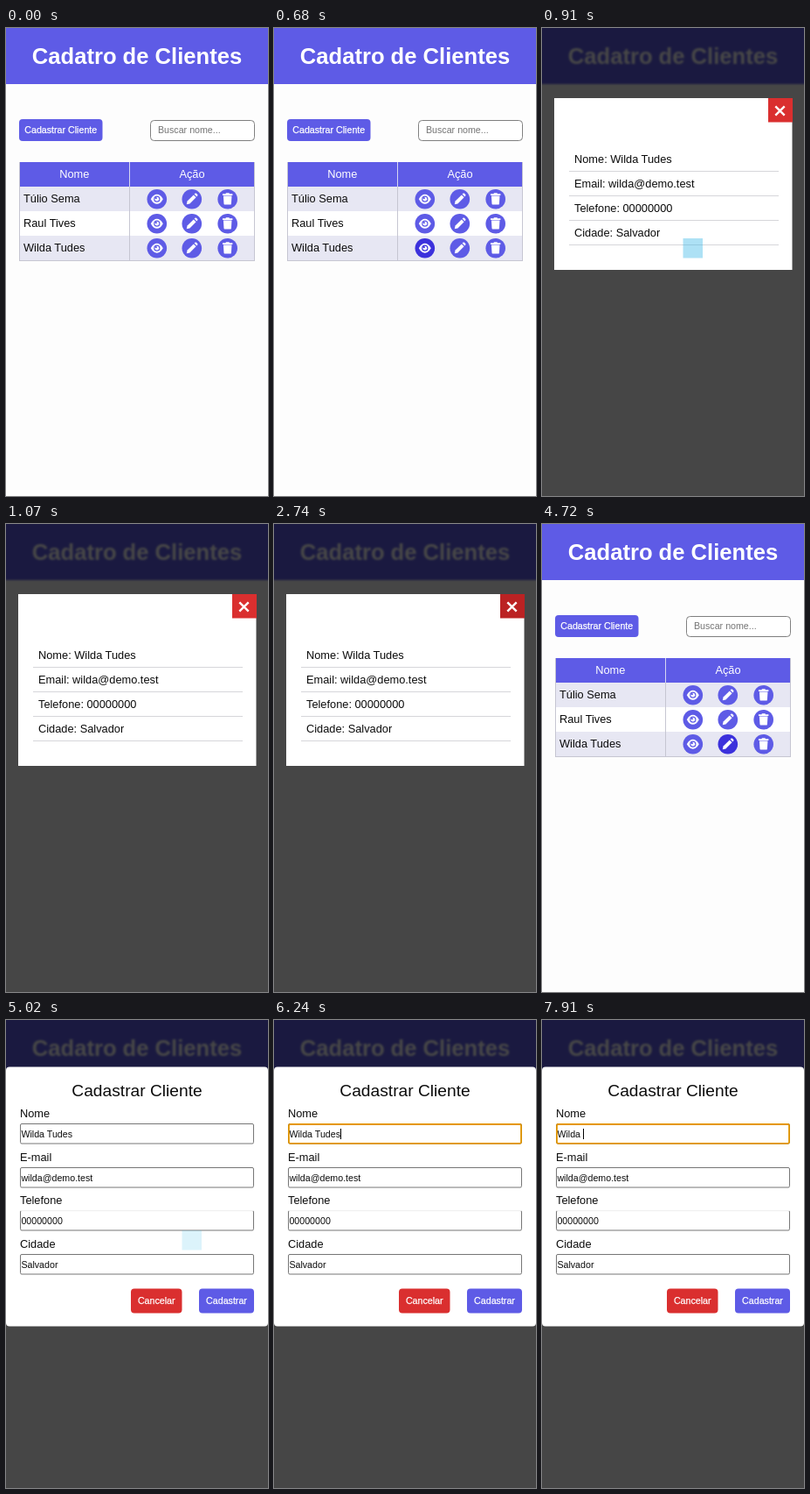
An HTML page that plays this animation: 300x534 px, repeating every 7990 ms.

```html
<!DOCTYPE html>
<html lang="pt">
<head>
<meta charset="utf-8">
<title>Clientes</title>
<style>
  html, body { margin: 0; width: 100%; height: 100%; overflow: hidden; background: #fdfdfd; }
  svg { display: block; width: 100vw; height: 100vh; }
  text { font: 12.8px "Liberation Sans", Arial, sans-serif; fill: #0c0c0c; white-space: pre; }
  .small { font-size: 10.667px; }
  .heading { font-size: 25.6px; font-weight: bold; }
  .title { font-size: 19.2px; }
  .mid { text-anchor: middle; }
  .light { fill: #fff; }
  .strong { stroke: #fff; stroke-width: .25; }
  .hint { fill: #757575; }
</style>
</head>
<body>
<svg id="stage" viewBox="0 0 300 534"></svg>
<script>
const PURPLE = '#5e5be6', DEEP = '#3c31dc', RED = '#da2f2f', DARK_RED = '#bb2223';
const TAP = '#33b5e5', STRONG = 0.4, FADED = 0.17;
const LOOP = 7990;
const client = { name: 'Wilda Tudes', email: 'wilda@demo.test', phone: '00000000', city: 'Salvador' };

const rect = (x, y, w, h, fill, extra = '') =>
  `<rect x="${x}" y="${y}" width="${w}" height="${h}" fill="${fill}" ${extra}/>`;
const text = (x, y, str, cls = '', extra = '') =>
  `<text x="${x}" y="${y}" class="${cls}" ${extra}>${str}</text>`;
const path = d => `<path d="${d}" fill="#fff"/>`;
const button = (x, y, w, h, fill, label, baseline) =>
  rect(x, y, w, h, fill, 'rx="4"') + text(x + w / 2, baseline, label, 'small light strong mid');

const icons = {
  eye: path('M-7 0Q-4-5.5 0-5.5T7 0Q4 5.5 0 5.5T-7 0Z') +
    '<circle r="3.6" fill="currentColor"/><circle r="2.4" fill="#fff"/>' +
    '<circle cx="-1" cy="-1" r="1.1" fill="currentColor"/>',
  pen: path('M-6 6L-5.2 2.4L2-4.8L4.8-2L-2.4 5.2Z') +
    path('M2.8-5.6L4-6.6Q4.6-7 5.2-6.4L6.4-5.2Q7-4.6 6.5-4L5.6-2.8Z'),
  bin: path('M-5.7-6H-2V-7H2V-6H5.7V-4.3H-5.7Z') +
    path('M-4.8-3.6H4.8L4.2 5.2Q4.1 6.4 3 6.4H-3Q-4.1 6.4-4.2 5.2Z')
};
const iconX = { eye: 172.8, pen: 212.8, bin: 253.7 };

function tableRow(name, i) {
  const y = 181 + i * 28;
  const actions = Object.keys(icons).map(kind =>
    `<g id="${kind}${i}" transform="translate(${iconX[kind]} ${y + 14.2})" color="${PURPLE}">
      <circle r="11.3" fill="currentColor"/>${icons[kind]}</g>`).join('');
  return rect(15, y, 270, 28, i % 2 ? '#fff' : '#e7e7f3') +
    rect(15, y + 28, 270, 1, '#c6c6d2') + text(20, y + 18, name) + actions;
}

const list = `<g id="list">
  ${button(15, 104, 95.5, 25, PURPLE, 'Cadastrar Cliente', 120)}
  ${rect(165.5, 105.5, 119, 23, '#fff', 'rx="4" stroke="#808080"')}
  ${text(174, 120, 'Buscar nome...', 'small hint')}
  ${rect(15, 153, 270, 28, PURPLE)}
  ${text(78.3, 171, 'Nome', 'light mid')}${text(213, 171, 'Ação', 'light mid')}
  ${['Túlio Sema', 'Raul Tives', client.name].map(tableRow).join('')}
  ${rect(141, 153, 1, 28, '#d6d6f2')}${rect(141, 181, 1, 85, '#c6c6d2')}
  ${rect(15, 153, 1, 113, '#c6c6d2')}${rect(284, 153, 1, 113, '#c6c6d2')}
</g>`;

const details = [['Nome', client.name], ['Email', client.email], ['Telefone', client.phone], ['Cidade', client.city]];
const view = `<g id="view">
  ${rect(14, 80, 272.5, 196, '#fff')}
  ${rect(259, 80, 28, 27.5, RED, 'id="close"')}
  <path d="M267.3 89.3L277.7 99.7M277.7 89.3L267.3 99.7" stroke="#fff" stroke-width="2.4"/>
  ${details.map(([key, value], i) =>
    text(37, 154 + i * 28, `${key}: ${value}`) + rect(31, 163 + i * 28, 240, 1, '#d6d6da')).join('')}
</g>`;

const fields = [['Nome', 118, client.name], ['E-mail', 168, client.email],
  ['Telefone', 217, client.phone], ['Cidade', 267, client.city]];
const form = `<g id="form">
  ${rect(0, 53.5, 300, 296, '#fff', 'rx="4"')}
  ${text(150, 87, 'Cadastrar Cliente', 'title mid')}
  ${fields.map(([label, y, value], i) =>
    text(16, y - 7, label) +
    rect(16.5, y + .5, 267, 22.5, '#fff', 'rx="1.5" stroke="#767676"') +
    text(17.4, y + 16, value, 'small', `id="value${i}"`)).join('')}
  ${rect(17, 217, 266, 1.2, '#f0f0f0')}
  ${rect(17, 119, 266, 21.8, 'none', 'id="focus" rx="1.5" stroke="#e59700" stroke-width="1.8"')}
  ${rect(0, 124, 1, 12, '#000', 'id="caret"')}
  ${rect(16, 118, 268, 24, TAP, 'id="fieldTap"')}
  ${button(143, 306.5, 58.5, 28, RED, 'Cancelar', 324)}
  ${button(221, 306.5, 63, 28, PURPLE, 'Cadastrar', 324)}
</g>`;

const stage = document.getElementById('stage');
stage.innerHTML = rect(0, 0, 300, 534, '#fdfdfd') +
  `<g id="header">${rect(-10, -10, 320, 74, PURPLE)}${text(150, 41, 'Cadatro de Clientes', 'heading light mid')}</g>` +
  list + rect(0, 0, 300, 534, '#000', 'id="shade" opacity=".72"') + view + form +
  rect(0, 240, 22.5, 22.5, TAP, 'id="iconTap"');

const el = id => document.getElementById(id);
const pen = document.createElement('canvas').getContext('2d');
pen.font = '10.667px "Liberation Sans", Arial, sans-serif';

// Each step changes only the listed parts of the state.
const steps = [
  [0, { scene: 'list', hover: '', iconTap: 0, tapX: 161.5, fieldTap: 0, focus: false, caret: false, chars: 11 }],
  [680, { hover: 'eye' }],
  [910, { scene: 'view', hover: '', iconTap: STRONG }],
  [990, { iconTap: FADED }],
  [1070, { iconTap: 0 }],
  [2740, { hover: 'close' }],
  [2970, { scene: 'list', hover: '' }],
  [4720, { hover: 'pen' }],
  [5020, { scene: 'form', hover: '', iconTap: FADED, tapX: 201.5 }],
  [5100, { iconTap: 0 }],
  [5860, { fieldTap: STRONG }],
  [6090, { fieldTap: FADED, focus: true, caret: true }],
  [6240, { fieldTap: 0 }],
  [6620, { caret: false }],
  [7000, { chars: 10, caret: true }],
  [7150, { chars: 9 }],
  [7230, { chars: 8 }],
  [7460, { chars: 7, caret: false }],
  [7610, { chars: 6 }],
  [7910, { caret: true }]
];

const show = (id, on) => { el(id).style.display = on ? '' : 'none'; };

function render(time) {
  const s = Object.assign({}, ...steps.filter(([at]) => at <= time).map(([, change]) => change));
  const modal = s.scene !== 'list';
  for (const id of ['list', 'view', 'form']) show(id, s.scene === id);
  show('shade', modal);
  el('header').style.filter = modal ? 'blur(.8px)' : '';
  for (const kind of ['eye', 'pen']) el(kind + 2).setAttribute('color', s.hover === kind ? DEEP : PURPLE);
  el('close').setAttribute('fill', s.hover === 'close' ? DARK_RED : RED);
  el('iconTap').setAttribute('x', s.tapX);
  el('iconTap').setAttribute('opacity', s.iconTap);
  el('fieldTap').setAttribute('opacity', s.fieldTap);
  show('focus', s.focus);
  show('caret', s.caret);
  const typed = client.name.slice(0, s.chars);
  el('value0').textContent = typed;
  el('caret').setAttribute('x', Math.floor(17.45 + pen.measureText(typed).width));
}

const start = performance.now();
function tick() {
  render((performance.now() - start) % LOOP);
  requestAnimationFrame(tick);
}
tick();
</script>
</body>
</html>
```
